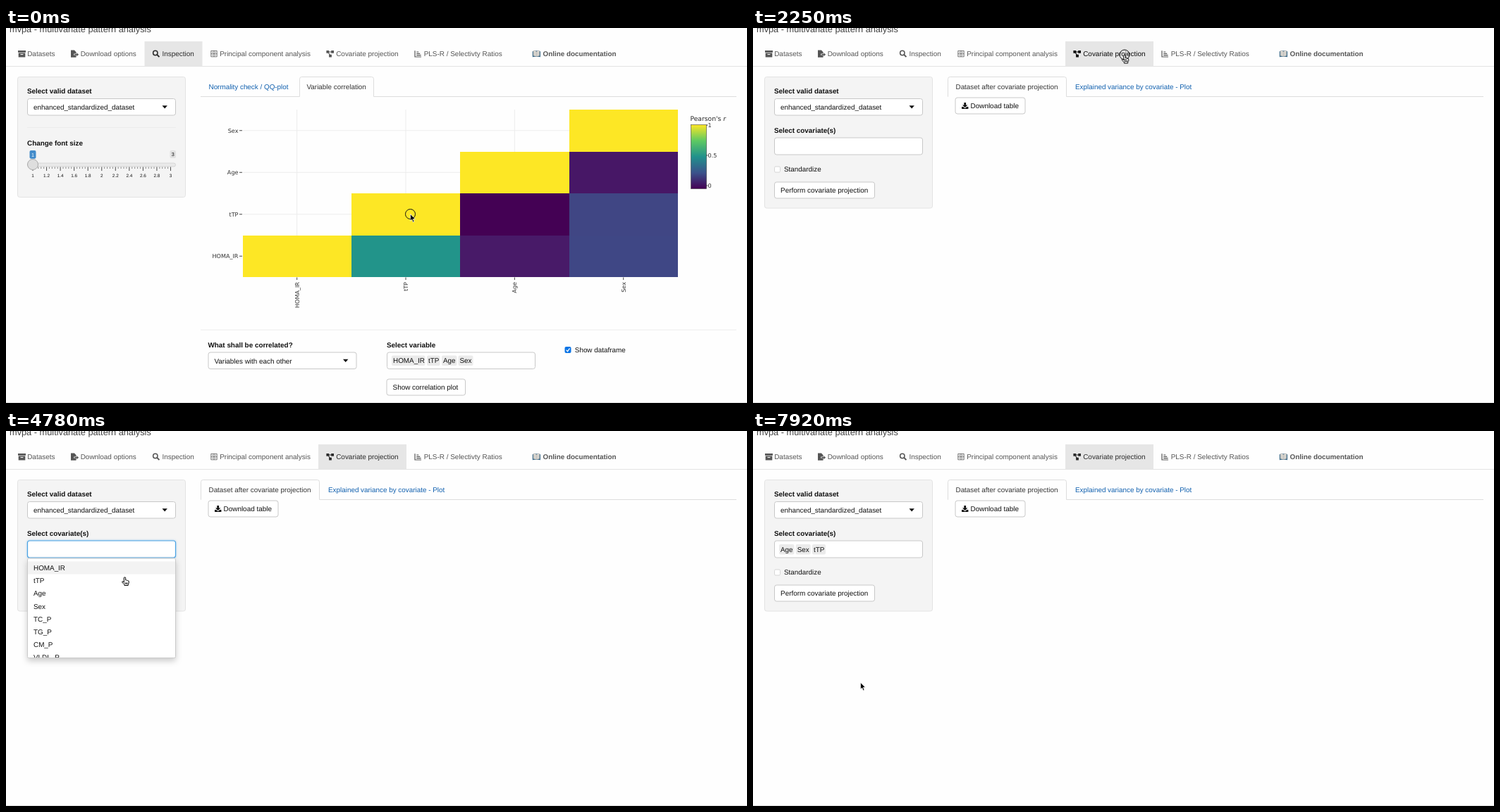
These frames come from a looping animation (1051 by 533 pixels, 8 s). An HTML page:

```html
<!DOCTYPE html>
<html lang="en">
<head>
<meta charset="utf-8">
<title>mvpa - multivariate pattern analysis</title>
<style>
  html, body { margin: 0; width: 100%; height: 100%; overflow: hidden; background: #fefefe; }
  svg { display: block; width: 1051px; height: 533px; }
  text { font: 9.88px "Liberation Sans", Arial, sans-serif; fill: #111; text-rendering: geometricPrecision; white-space: pre; }
  .title { font-size: 12.78px; fill: #444; }
  .b { font-weight: bold; }
  .link { fill: #0f5fae; }
  .tab { fill: #333; }
  .plot { font: 8.1px "DejaVu Sans", sans-serif; fill: #333; }
  .legend { font: 9.2px "DejaVu Sans", sans-serif; fill: #2a2a2a; }
  .tiny { font-size: 6.4px; text-anchor: middle; }
  .small { font-size: 7.2px; text-anchor: middle; }
  .end { text-anchor: end; }
  .nav text { font-size: 9.95px; }
  .nav text.b { font-size: 9.87px; }
  .nav, .nav text { fill: #555; color: #555; }
  .nav.on, .nav.on text { fill: #2a2a2a; color: #2a2a2a; }
  .nav.hot, .nav.hot text { fill: #0a0a0a; color: #0a0a0a; }
  .nav .bg { fill: none; }
  .nav.on .bg { fill: #e6e6e6; }
  .nav .ln { fill: none; stroke: currentColor; }
  .tile { shape-rendering: crispEdges; }
  .box { fill: #fff; stroke: #c8c8c8; }
  .well { fill: #f4f4f4; stroke: #e3e3e3; }
  .rule { stroke: #ddd; fill: none; }
  .faint { stroke: #ececec; }
  .tag { fill: #ebebeb; }
  .btn + text { font-size: 9.95px; }
  .hot .box.btn { fill: #e6e6e6; stroke: #adadad; }
  .focus .field { stroke: #4ba3e3; stroke-width: 1.2; filter: drop-shadow(0 0 1.5px #66afe999); }
  .menu { fill: #fff; stroke: #cacaca; filter: drop-shadow(0 4px 4px #0003); }
</style>
</head>
<body>
<svg id="stage" viewBox="0 0 1051 533"></svg>
<script>
const LOOP = 8000;

const text = (x, y, s, cls = '', extra = '') => `<text x="${x}" y="${y}" class="${cls}" ${extra}>${s}</text>`;
const rect = (x, y, w, h, attrs = '') => `<rect x="${x}" y="${y}" width="${w}" height="${h}" ${attrs}/>`;
const line = (x1, y1, x2, y2, attrs = 'class="rule"') => `<path d="M${x1} ${y1}L${x2} ${y2}" ${attrs}/>`;
const path = (d, attrs = '') => `<path d="${d}" ${attrs}/>`;
const group = (id, body, attrs = '') => `<g id="${id}" ${attrs}>${body}</g>`;
const box = (x, y, w, h = 24, cls = '') => rect(x + .5, y + .5, w, h, `rx="3" class="box ${cls}"`);
const button = (x, y, w, s, dx = 9) => box(x, y, w, 23, 'btn') + text(x + dx, y + 15.3, s);
const dropdown = (x, y, s) => box(x, y, 210, 23.5) + text(x + 9, y + 16, s) +
  path(`M${x + 191.5} ${y + 10.2}h7.4l-3.7 4.3z`, 'fill="#111"');
const tag = (x, y, w, s) => rect(x, y, w, 14.5, 'rx="2" class="tag"') + text(x + 2, y + 10.6, s);

// Navigation bar
const icons = {
  archive: path('M17 32h11v2.8h-11zM17.7 35.6h9.6v6h-9.6z') + rect(20.6, 37, 3.8, 1.1, 'fill="#fefefe"'),
  file: path('M92 31.6h5l2.5 2.6v2.3h-3.2v2.2h3.2v3.1h-7.5zM97.3 37h3v-1.8l2.8 2.5-2.8 2.5v-1.8h-3z'),
  search: '<circle cx="211.8" cy="35.5" r="3.2" class="ln" stroke-width="1.5"/>' +
    line(214.2, 37.9, 217.4, 41.1, 'class="ln" stroke-width="2"'),
  grid: path('M290.8 32.4h8.4v8.4h-8.4zM295 32.4v8.4M290.8 36.6h8.4', 'class="ln" stroke-width=".8"') +
    path('M292.2 34.5h1.4M296.4 34.5h1.4M292.2 38.7h1.4M296.4 38.7h1.4', 'class="ln" stroke-width=".8"'),
  nodes: path('M454.4 32h3.8v3.8h-3.8zM461.2 32h3.8v3.8h-3.8zM458.1 37.8h3.8v3.8h-3.8z') +
    path('M457 34h5M457 34.5l3 5', 'class="ln" stroke-width="1.1"'),
  bars: path('M580 32.2v8.8h9M582.3 34h3M582.3 36.3h5M582.3 38.6h6.3', 'class="ln" stroke-width="1.2"'),
  book: path('M746.8 33.2l5.6-.9 5.6.9v8l-5.6-.6-5.6.6z', 'fill="#35698c"') +
    path('M748 32.6q2.6-.7 4.4.8q1.8-1.5 4.4-.8v7.2q-2.6-.5-4.4.7q-1.8-1.2-4.4-.7z', 'fill="#f2efe8" stroke="#666" stroke-width=".4"') +
    path('M749 34.6h2.4M749 36.3h2.4M749 38h2.4M753.4 34.6h2.4M753.4 36.3h2.4M753.4 38h2.4M752.4 33.4v7', 'stroke="#888" stroke-width=".6"')
};
const navItems = [
  ['archive', 30.2, 'Datasets'], ['file', 105.7, 'Download options'],
  ['search', 221.5, 'Inspection', 196.5, 82], ['grid', 303.2, 'Principal component analysis'],
  ['nodes', 468.2, 'Covariate projection', 443, 125], ['bars', 592.7, 'PLS-R / Selectivty Ratios'],
  ['book', 761.5, 'Online documentation']
];
const nav = navItems.map(([icon, x, s, bx = 0, bw = 0]) =>
  group('nav-' + icon, rect(bx, 19, bw, 35, 'class="bg"') + icons[icon] +
    text(x, 40.2, s, icon === 'book' ? 'b' : ''), 'class="nav"')).join('');

const header = text(5, 5.7, 'mvpa - multivariate pattern analysis', 'title') +
  line(0, 54.5, 1051, 54.5, 'stroke="#e4e4e4"') + nav +
  line(0, 532.5, 1051, 532.5, 'stroke="#dedede"');

const well = h => rect(16.5, 69.5, 238, h, 'rx="3" class="well"') +
  text(30, 93.4, 'Select valid dataset', 'b') + dropdown(30, 100, 'enhanced_standardized_dataset');

const tabs = (x, w) => path(`M276 97.5H${x + .5}V72.5q0-3 3-3H${x + w - 2.5}q3 0 3 3V97.5H1036`, 'class="rule"');

// Font size slider
const slider = () => {
  let s = rect(30.5, 192, 210, 5, 'rx="2.5" fill="#e9e9e9" stroke="#ccc" stroke-width=".7"');
  for (let i = 0; i <= 50; i++) {
    const x = 38 + i * 3.91, major = i % 5 === 0;
    s += line(x, 197.5, x, major ? 203 : 200, `stroke="#222" stroke-width="${major ? .8 : .5}"`);
    if (major) s += text(x, 212.2, +(1 + i / 25).toFixed(1), 'tiny');
  }
  return s + rect(33.5, 174, 9, 11.7, 'rx="2" fill="#428bca"') + text(38, 182.6, 1, 'small', 'style="fill:#fff"') +
    rect(232.5, 174, 8.5, 11, 'rx="2" fill="#e1e1e1"') + text(236.8, 182.4, 3, 'small') +
    '<circle cx="38" cy="194" r="7.5" fill="#dedede" stroke="#aaa"/>';
};

// Correlation heat map
const names = ['HOMA_IR', 'tTP', 'Age', 'Sex'];
const cells = [
  ['#fde725'],
  ['#22948a', '#fde725'],
  ['#481a68', '#440154', '#fde725'],
  ['#3f4785', '#404684', '#471766', '#fde725']
];
const CW = 154.35, CH = 59.5, X0 = 335.5, Y0 = 354;
const heatmap = () => {
  let grid = '', tiles = '', labels = '';
  names.forEach((n, i) => {
    const cx = X0 + CW * (i + .5), cy = Y0 - CH * (i + .5);
    grid += line(cx, 116, cx, Y0, 'class="faint"') + line(X0, cy, 953, cy, 'class="faint"');
    labels += line(331, cy, 335, cy, 'stroke="#444"') + line(cx, 354.5, cx, 358, 'stroke="#444"') +
      text(329.5, cy + 3, n, 'plot end') +
      text(0, 0, n, 'plot end', `transform="translate(${cx + 3} 361) rotate(-90)"`);
    cells[i].forEach((c, j) => {
      tiles += rect(X0 + CW * i, Y0 - CH * (j + 1), CW, CH, `class="tile" fill="${c}"`);
    });
  });
  const stops = ['#fde725', '#5ec962', '#21918c', '#3b528b', '#440154']
    .map((c, i) => `<stop offset="${i / 4}" stop-color="${c}"/>`).join('');
  const ticks = [[1, 138], [.5, 181], [0, 224]].map(([v, y]) =>
    line(993, y, 995.5, y, 'stroke="#444"') + text(995.5, y + 3, v, 'plot')).join('');
  return grid + tiles + labels +
    `<linearGradient id="viridis" x2="0" y2="1">${stops}</linearGradient>` +
    text(970.5, 131.5, 'Pearson\'s <tspan font-style="italic">r</tspan>', 'legend') +
    rect(971.5, 137.5, 22, 91, 'fill="url(#viridis)" stroke="#444" stroke-width=".6"') + ticks;
};

const inspection = well(171) + line(30, 141.5, 241, 141.5, 'class="faint"') +
  text(30, 167, 'Change font size', 'b') + slider() + tabs(416, 105) +
  text(287.5, 87.4, 'Normality check / QQ-plot', 'link') + text(426.5, 87.4, 'Variable correlation', 'tab') +
  heatmap() + line(276, 429, 1036, 429, 'class="faint"') +
  text(286.5, 453.7, 'What shall be correlated?', 'b') + dropdown(286.5, 460.5, 'Variables with each other') +
  text(540, 453.7, 'Select variable', 'b') + box(540, 460.5, 210, 23.5) +
  tag(547, 465.5, 47.5, 'HOMA_IR') + tag(597, 465.5, 18.5, 'tTP') + tag(618, 465.5, 21.5, 'Age') + tag(641.5, 465.5, 21, 'Sex') +
  rect(792.5, 453, 9, 9, 'rx="2" fill="#0b74e5"') + path('M794.7 457.6l1.8 2 3-4.2', 'fill="none" stroke="#fff" stroke-width="1.3"') +
  text(806.8, 461, 'Show dataframe') + button(539.5, 498.5, 111.5, 'Show correlation plot');

// Covariate page with its option list
const TOP = 185.4, ROW = 18.2;
const projection = well(186.5) + text(30, 149, 'Select covariate(s)', 'b') +
  group('entry', box(30, 155.5, 210, 24, 'field')) +
  [tag(37, 161, 21.5, 'Age'), tag(60.7, 161, 21, 'Sex'), tag(84, 161, 19, 'tTP')].map((t, i) => group('tag' + i, t)).join('') +
  rect(30.5, 197, 8, 8, 'rx="1.5" fill="#fff" stroke="#ccc" stroke-width=".8"') + text(44, 204.4, 'Standardize') +
  button(30, 218.5, 142, 'Perform covariate projection') +
  tabs(276, 168) + text(287.5, 87.4, 'Dataset after covariate projection', 'tab') +
  text(457, 87.4, 'Explained variance by covariate - Plot', 'link') +
  group('download', button(286.5, 98.5, 99, 'Download table', 22) +
    path('M299.3 106h2.8v3.4h2.4l-3.8 3.7-3.8-3.7h2.4zM296 112h2.2l2.5 2.3 2.5-2.3h2.2v3h-9.4z', 'fill="#111"')) +
  group('list', rect(30.5, 181, 210, 141.5, 'rx="2" class="menu"') +
    '<clipPath id="inside"><rect x="31" y="182" width="209" height="140"/></clipPath>' +
    `<g clip-path="url(#inside)">${rect(31, TOP, 209, ROW, 'id="active" fill="#f3f3f3"')}<g id="rows"></g></g>`);

const pointer = group('mouse',
  path('M0 0V9.6L2.2 7.6 3.8 11.4 5.5 10.7 3.9 7H6.9Z', 'id="arrow" fill="#000" stroke="#fff" stroke-width=".7"') +
  path('M-1.2 1.5a1.2 1.2 0 0 1 2.4 0V4.5q1.2-.6 1.7.4 1.1-.5 1.5.4 1.3-.2 1.3 1.2V8.6L4.7 10.4V12H-.6V10.8L-3.6 7.6q-.6-1.4.8-1.4L-1.2 7.6ZM.4 8v2.2M2 8v2.2M3.6 8v2.2',
    'id="hand" fill="#fff" stroke="#000" stroke-width="1" stroke-linejoin="round"') +
  path('M-2-5.5q2 0 2 1.5V4q0 1.5-2 1.5M2-5.5q-2 0-2 1.5M0 4q0 1.5 2 1.5', 'id="beam" fill="none" stroke="#222" stroke-width=".9"') +
  '<circle id="ring" r="7" fill="none" stroke="#111"/>');

document.getElementById('stage').innerHTML =
  header + group('inspection', inspection) + group('projection', projection) + pointer;

const $ = id => document.getElementById(id);
const show = (id, on) => { $(id).style.display = on ? '' : 'none'; };
const within = (t, a, b) => t >= a && t < b;

// Pointer stops: time, x, y, shape
const stops = [
  [0, 573.5, 264.5, 'arrow'], [900, 572, 258, 'arrow'], [1050, 563, 222, 'arrow'], [1200, 551, 160, 'arrow'],
  [1350, 540, 100, 'arrow'], [1500, 532, 62, 'arrow'], [1650, 528, 44, 'hand'], [1800, 527, 38, 'hand'],
  [2850, 518, 44, 'hand'], [3000, 455, 66, 'arrow'], [3150, 360, 92, 'arrow'], [3290, 284, 107, 'arrow'],
  [3440, 255, 114, 'arrow'], [3590, 240, 119, 'hand'], [3740, 234, 122, 'hand'], [3890, 232.5, 124, 'hand'],
  [4040, 215, 148, 'arrow'], [4190, 201.5, 167, 'beam'],
  [4780, 168.5, 207.5, 'hand'], [4930, 160, 220, 'hand'], [5080, 156, 227, 'hand'], [5230, 155, 229, 'hand'],
  [6270, 155, 228, 'hand'], [6420, 155, 225, 'hand'], [6570, 154.5, 220, 'hand'], [6720, 154.5, 217.5, 'hand'],
  [7320, 154, 235, 'hand'], [7470, 153, 305, 'hand'], [7620, 152.5, 360, 'arrow'], [7920, 152.5, 357.5, 'arrow']
];
const clicks = [[0, 150], [2250, 2400], [4340, 4490], [5380, 5530], [5970, 6120], [6870, 7020], [7770, 7920]];
const picks = [['Age', 5530], ['Sex', 6120], ['tTP', 7020]];
const options = [...names, 'TC_P', 'TG_P', 'CM_P', 'VLDL_P', 'LDL_P', 'HDL_P', 'VLDL_D'];
let shown = '';

function draw(t) {
  const [, x, y, shape] = stops.findLast(s => s[0] <= t);
  const second = t >= 2250, open = within(t, 4340, 7770);
  $('mouse').setAttribute('transform', `translate(${x} ${y})`);
  ['arrow', 'hand', 'beam'].forEach(s => show(s, s === shape));
  show('ring', clicks.some(c => within(t, ...c)));

  show('inspection', !second);
  show('projection', second);
  $('nav-search').classList.toggle('on', !second);
  $('nav-nodes').classList.toggle('on', second);
  $('nav-nodes').classList.toggle('hot', within(t, 1650, 3000));
  $('download').classList.toggle('hot', within(t, 3150, 3440));

  $('entry').classList.toggle('focus', open);
  show('list', open);
  picks.forEach(([, at], i) => show('tag' + i, t >= at));
  const taken = picks.filter(p => t >= p[1]).map(p => p[0]);
  const rows = options.filter(o => !taken.includes(o)).slice(0, 8)
    .map((o, i) => text(39, TOP + 12.6 + ROW * i, o)).join('');
  if (rows !== shown) $('rows').innerHTML = shown = rows;
  const row = t < 4930 ? 0 : Math.min(7, Math.max(0, Math.floor((y - TOP) / ROW)));
  $('active').setAttribute('y', TOP + ROW * row);
}

function tick() {
  draw(performance.now() % LOOP);
  requestAnimationFrame(tick);
}
tick();
</script>
</body>
</html>
```
